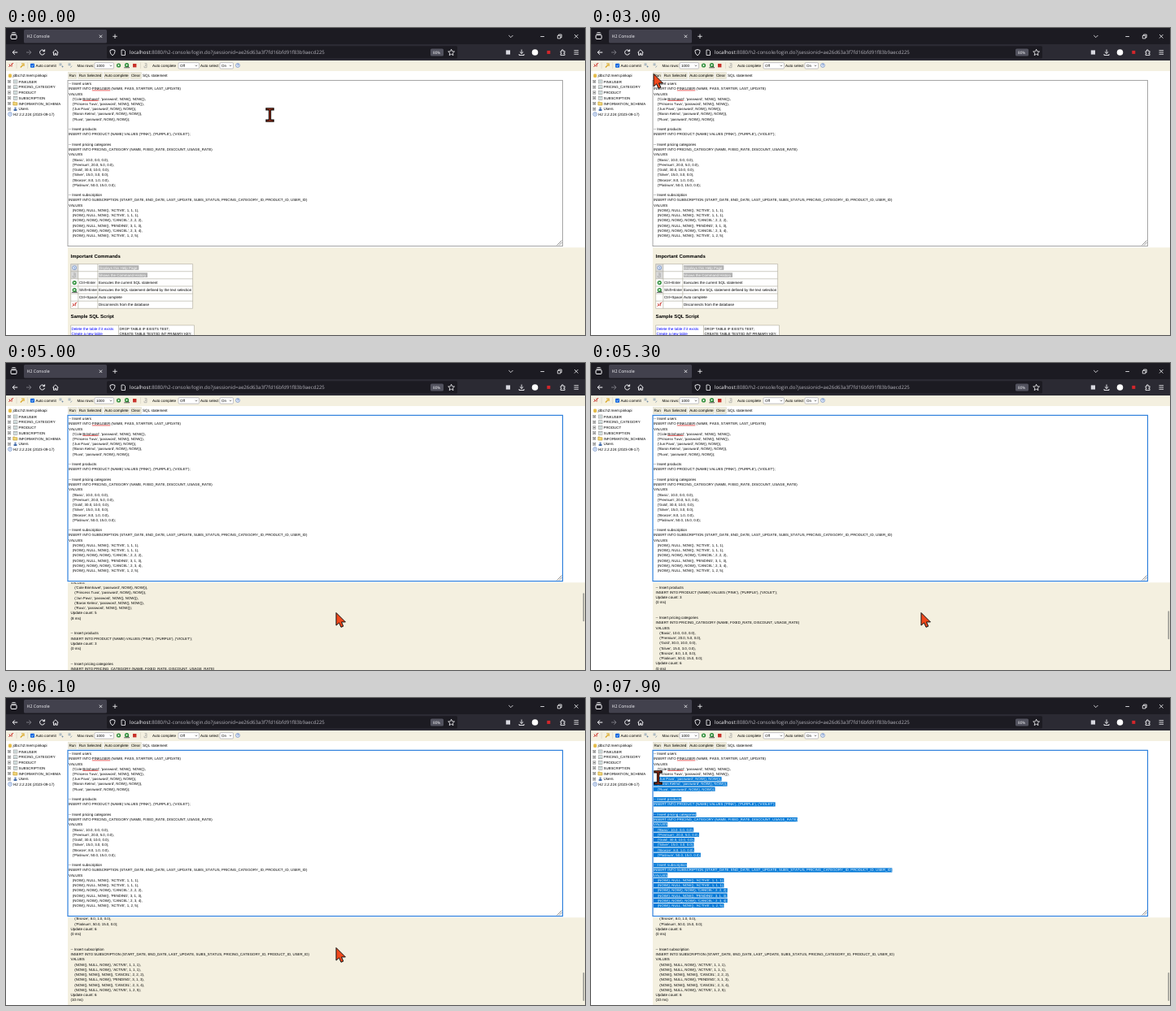
An HTML page for the animation above (8 s loop, 712 px wide and 378 px high).

```html
<!DOCTYPE html>
<html lang="en">
<head>
<meta charset="utf-8">
<title>H2 Console</title>
<style>
html, body { margin: 0; height: 100%; overflow: hidden; background: #fff; }
svg { display: block; width: 712px; height: 378px; }
text { font-family: "Liberation Sans", Arial, sans-serif; font-kerning: none; text-rendering: geometricPrecision; }
.ui { font-family: "Open Sans", "Noto Sans", sans-serif; }
.bold { font-weight: bold; }
</style>
</head>
<body>
<svg id="stage" viewBox="0 0 712 378"></svg>
<script>
const stage = document.getElementById('stage');
const CREAM = '#f4f0e0', LIGHT = '#fbfbfe', BLUE = '#0078d7', GREEN = '#2f8f3a', RED = '#c8322b';

function add(parent, tag, attrs = {}, text) {
  const el = document.createElementNS('http://www.w3.org/2000/svg', tag);
  for (const k in attrs) el.setAttribute(k, attrs[k]);
  if (text !== undefined) el.textContent = text;
  return parent.appendChild(el);
}
const group = (parent, attrs) => add(parent, 'g', attrs);
const rect = (p, x, y, width, height, fill, more) => add(p, 'rect', { x, y, width, height, fill, ...more });
const dot = (p, cx, cy, r, fill, more) => add(p, 'circle', { cx, cy, r, fill, ...more });
const line = (p, d, stroke, w = 1, more) =>
  add(p, 'path', { d, stroke, 'stroke-width': w, fill: 'none', ...more });
// cy is the middle of the capitals
const label = (p, x, cy, str, size = 4.55, fill = '#000', cls = '') =>
  add(p, 'text', { x, y: cy + size * 0.36, 'font-size': size, fill, class: cls }, str);

// ---- Browser frame ----
function browser() {
  const g = group(stage);
  rect(g, 0, 0, 712, 20, '#1c1b22');
  rect(g, 22, 2, 102, 16.5, '#42414d', { rx: 1.5 });
  rect(g, 0, 20, 712, 20, '#2b2a33');
  rect(g, 124, 22.3, 431, 15.2, '#1c1b22', { rx: 1.5 });
  line(g, 'M6.5 7H12.5M7.5 5.5H11.5', LIGHT, .7);
  rect(g, 6, 8.5, 7, 5, 'none', { stroke: LIGHT, rx: 1 });
  label(g, 25.5, 10.3, 'H2 Console', 5.3, LIGHT, 'ui');
  line(g, `M114.8 8.6l3.4 3.4m0-3.4l-3.4 3.4M131.3 10.3h5.4m-2.7-2.7v5.4
    M618.2 9l2.6 2.6 2.6-2.6M657.3 10.5h4.6M678.3 9.3h3.6v3.6h-3.6zM679.6 9.3v-1.3h3.6v3.6h-1.3
    M699 8l4.5 4.5m0-4.5l-4.5 4.5`, LIGHT, .8);
  line(g, 'M14.2 30H8.2m2.7-2.7L8.2 30l2.7 2.7', LIGHT);
  line(g, 'M25 30h6m-2.7-2.7L31 30l-2.7 2.7', '#77767f');
  line(g, 'M47 28.2a3 3 0 1 0 .5 2.6M47.6 26.4v2.3h-2.4', LIGHT);
  line(g, 'M57.4 30.2l3.5-3.4 3.5 3.4M58.5 29.5v3.8h1.7v-2h1.4v2h1.7v-3.8', LIGHT, .9);
  line(g, 'M131 26.5l3 1c0 3-.8 5-3 6.2c-2.2-1.2-3-3.2-3-6.2z', LIGHT, .9);
  line(g, 'M142 27h3l1.5 1.5v5h-4.5z', LIGHT, .8);
  const url = label(g, 152, 30, '', 6.1, '#b4b3bb', 'ui');
  add(url, 'tspan', { fill: LIGHT }, 'localhost');
  add(url, 'tspan', {}, ':8080/h2-console/login.do?jsessionid=ae26d63a3f7fd16bfd91f83b9aecd225');
  rect(g, 522, 25.5, 16, 9, '#52525e', { rx: 1.5 });
  label(g, 525, 30, '80%', 4.7, LIGHT, 'ui');
  line(g, 'M547.6 26.2l1.1 2.6 2.8.2-2.1 1.9.6 2.7-2.4-1.4-2.4 1.4.6-2.7-2.1-1.9 2.8-.2z', LIGHT, .8);
  rect(g, 614.8, 27.4, 5.2, 5.2, '#d8d8df');
  line(g, 'M634 26.5v5m-2.2-2.1l2.2 2.1 2.2-2.1M631 32v1.5h6V32', LIGHT, .9);
  dot(g, 650.5, 30, 3.8, '#fff');
  rect(g, 665.3, 27.9, 4, 4, '#d4262b');
  line(g, 'M682 28.5h1.5v-1.6h1.6v1.6h2v2h-1.2v1.2h1.2v1.8h-5.1v-1.6h1v-1.4h-1z', LIGHT, .8);
  line(g, 'M698.5 27.7h5.6m-5.6 2.3h5.6m-5.6 2.3h5.6', LIGHT, .8);
}

// ---- Console toolbar and tree ----
const play = (g, x, y, r = 2.6) => {
  dot(g, x, y, r, GREEN);
  add(g, 'path', { d: `M${x - .9} ${y - 1.4}l2.4 1.4l-2.4 1.4z`, fill: '#fff' });
};
const playSelected = (g, x, y) => {
  play(g, x, y - .3);
  line(g, `M${x - 3.3} ${y + 2.8}h6.6M${x + 1.5} ${y + 1}l1.6 1.6`, '#333', .8);
};
const info = (g, x, y, mark = '?') => {
  dot(g, x, y, 2.4, '#eef4ff', { stroke: '#4770b5', 'stroke-width': .6 });
  label(g, x - (mark === '?' ? 1 : .5), y, mark, 3.7, '#2857a8', 'bold');
};
const unplug = (g, x, y) =>
  line(g, `M${x - 2.6} ${y + 2}l2-2m1.6-1l2-2M${x - 2} ${y - 1.5}l1.6 2.6M${x + 1} ${y + 1.6}v-4`, RED);
const scroll = (g, x, y) =>
  line(g, `M${x - 1.5} ${y - 2.5}h2.5v5h-3v-2M${x - 1} ${y - 1}h1.4m-1.4 1.3h1.4`, '#999', .6);

function select(g, x, w, str) {
  rect(g, x, 42.7, w, 7.4, '#fff', { rx: 1.2, stroke: '#8f8f9d', 'stroke-width': .5 });
  label(g, x + 2, 46.5, str, 4.5);
  line(g, `M${x + w - 4.8} 45.8l1.3 1.3l1.3-1.3`, '#333', .6);
}

function toolbar() {
  const g = group(stage);
  rect(g, 0, 40, 712, 13, CREAM);
  line(g, 'M13 42.5v7.5M26.5 42.5v7.5M165.5 42.5v7.5', '#cfcbbb', .5);
  unplug(g, 6, 46);
  line(g, 'M17.8 48.5l3-3m-1.8-1.5h3v3', '#d9a520', 1.2);
  rect(g, 30, 43.8, 5, 5, '#0060df', { rx: .8 });
  line(g, 'M31.2 46.3l1 1.1 1.7-2.2', '#fff', .7);
  label(g, 36.5, 46.3, 'Auto commit');
  line(g, 'M65.5 44h3m-3 1.7h3M68.5 47.5h2m-1-1v2M76.5 44h3m-3 1.7h3M79.5 48.5l1.5-1.8', '#5f7f9f', .7);
  label(g, 87.5, 46.3, 'Max rows:');
  select(g, 109, 23.5, '1000');
  play(g, 138.5, 46);
  playSelected(g, 148.5, 46);
  rect(g, 156, 44, 4.4, 4.4, RED);
  scroll(g, 172, 46.2);
  label(g, 180, 46.3, 'Auto complete');
  select(g, 212, 25.5, 'Off');
  label(g, 239, 46.3, 'Auto select');
  select(g, 263, 16.5, 'On');
  info(g, 285, 46);
}

function tree() {
  const g = group(stage);
  rect(g, 3, 56.5, 4, 4.6, '#e5bd4c', { rx: 1.3 });
  label(g, 8.5, 58.8, 'jdbc:h2:mem:pinkapi', 4.6);
  ['PINKUSER', 'PRICING_CATEGORY', 'PRODUCT', 'SUBSCRIPTION', 'INFORMATION_SCHEMA', 'Users'].forEach((name, i) => {
    const y = 66 + 6.75 * i;
    rect(g, 2.4, y - 1.7, 3.4, 3.4, '#fff', { stroke: '#777', 'stroke-width': .5 });
    line(g, `M3 ${y}h2.2m-1.1-1.1v2.2`, '#222', .5);
    if (i < 4) {
      rect(g, 9.3, y - 2, 4.6, 4, '#fff', { stroke: '#777', 'stroke-width': .5 });
      line(g, `M9.3 ${y - .7}h4.6M9.3 ${y + .7}h4.6M11.5 ${y - 2}v4`, '#8aa', .4);
    } else if (i === 4) {
      line(g, `M8.8 ${y + 2}v-4h2l.6.8h2.4v3.2z`, '#b58d20', .6, { fill: '#f3d779' });
    } else {
      dot(g, 11.5, y - 1, 1.2, '#6a88b8');
      rect(g, 9.4, y + .2, 4.2, 2, '#3f68a8', { rx: 1 });
    }
    label(g, 15.5, y, name, name === 'Users' ? 4.6 : 4.36);
  });
  info(g, 5, 106.1, 'i');
  label(g, 9, 106.1, 'H2 2.2.224 (2023-09-17)', 4.61);
}

// ---- Statements ----
const person = name => `    ('${name}', 'password', NOW(), NOW())`;
const price = (name, nums) => `    ('${name}', ${nums})`;
const sub = (end, rest) => `    (NOW(), ${end}, NOW(), ${rest})`;
const rows = list => list.map((s, i) => s + (i < list.length - 1 ? ',' : ';'));

const blocks = [
  { count: 5, ms: 8, sql: ['-- Insert users', 'INSERT INTO PINKUSER (NAME, PASS, STARTER, LAST_UPDATE)', 'VALUES',
    ...rows(['Cole Brimhavel', 'Princess Tuva', 'Jun Pavo', 'Baron Kelmo', 'Ruvo'].map(person))] },
  { count: 3, ms: 0, sql: ['-- Insert products',
    "INSERT INTO PRODUCT (NAME) VALUES ('PINK'), ('PURPLE'), ('VIOLET');"] },
  { count: 6, ms: 0, sql: ['-- Insert pricing categories',
    'INSERT INTO PRICING_CATEGORY (NAME, FIXED_RATE, DISCOUNT, USAGE_RATE)', 'VALUES',
    ...rows([price('Basic', '10.0, 0.0, 0.0'), price('Premium', '20.0, 5.0, 0.0'), price('Gold', '30.0, 10.0, 0.0'),
      price('Silver', '15.0, 3.0, 0.0'), price('Bronze', '8.0, 1.0, 0.0'), price('Platinum', '50.0, 15.0, 0.0')])] },
  { count: 6, ms: 10, sql: ['-- Insert subscription',
    'INSERT INTO SUBSCRIPTION (START_DATE, END_DATE, LAST_UPDATE, SUBS_STATUS, PRICING_CATEGORY_ID, PRODUCT_ID, USER_ID)',
    'VALUES',
    ...rows([sub('NULL', "'ACTIVE', 1, 1, 1"), sub('NULL', "'ACTIVE', 1, 1, 1"), sub('NOW()', "'CANCEL', 2, 2, 2"),
      sub('NULL', "'PENDING', 3, 1, 3"), sub('NOW()', "'CANCEL', 2, 3, 4"), sub('NULL', "'ACTIVE', 1, 2, 5")])] }
];
const script = blocks.flatMap((b, i) => i ? ['', ...b.sql] : b.sql);
const output = blocks.flatMap(b => [...b.sql, `Update count: ${b.count}`, `(${b.ms} ms)`, '', '']);

const PITCH = 6.233, TOP = 65.4;
const sqlLine = (g, x, y, s, fill) => {
  const bare = s.trimStart(), size = /^(--|Up|\(\d+ )/.test(bare) ? 4.54 : 4.36;
  return label(g, x + (s.length - bare.length) * 1.21, y, bare, size, fill);
};

function editor() {
  const g = group(stage);
  [['Run', 76.5, 10.5], ['Run Selected', 88.7, 30], ['Auto complete', 120.3, 31.2], ['Clear', 153, 13.5]].forEach(([s, x, w]) => {
    rect(g, x, 54.6, w, 8, '#ece9d8', { stroke: '#d5d1c0', 'stroke-width': .4 });
    label(g, x + 1, 58.6, s, 4.6);
  });
  label(g, 168, 58.6, 'SQL statement', 4.6);
  const box = rect(g, 76, 64.4, 608.5, 204.2, '#fff');
  line(g, 'M677.5 267.5l6-6M680 267.5l3.5-3.5', '#888', .9);
  script.forEach((s, i) => sqlLine(g, 77, TOP + PITCH * (i + .5), s));
  line(g, 'M105.8 76.9h22.5M94.3 89.4h19.4', '#e02020', .7);
  return box;
}

function selection() {
  const clip = add(add(stage, 'clipPath', { id: 'picked' }), 'path');
  const g = group(stage, { 'clip-path': 'url(#picked)' });
  script.forEach((s, i) => {
    if (!s) return;
    const t = sqlLine(g, 77, TOP + PITCH * (i + .5), s, '#fff');
    const w = +t.getAttribute('x') - 77 + t.getComputedTextLength();
    g.insertBefore(rect(g, 77, TOP + PITCH * i + .6, w, 5.2, BLUE), t);
  });
  const reach = (x, y) => {
    const top = TOP + PITCH * Math.floor((y - TOP) / PITCH);
    clip.setAttribute('d', `M${x} ${top}H700V269H70V${top + PITCH}H${x}z`);
  };
  return { g, reach };
}

// ---- Lower pane ----
function help() {
  const g = group(stage), Y = 290.6, H = 9.12;
  label(g, 79.5, 280.5, 'Important Commands', 5.93, '#000', 'bold');
  rect(g, 79.6, Y, 150, H * 6, '#fff');
  rect(g, 79.6, Y, 9.2, H * 2, '#d9d9d9');
  const grid = [['', 'Displays this Help Page'], ['', 'Shows the Command History'],
    ['Ctrl+Enter', 'Executes the current SQL statement'],
    ['Shift+Enter', 'Executes the SQL statement defined by the text selection'],
    ['Ctrl+Space', 'Auto complete'], ['', 'Disconnects from the database']];
  grid.forEach(([key, text], i) => {
    const y = Y + H * (i + .5);
    if (i < 2) rect(g, 113.8, y - 2.9, i ? 60.2 : 49.5, 5.6, '#b1b1b1');
    label(g, 90, y, key, 4.45);
    label(g, 114, y, text, 4.5, i < 2 ? '#fff' : '#000');
  });
  let d = 'M79.6 290.6v54.7M88.8 290.6v54.7M112.8 290.6v54.7M229.6 290.6v54.7';
  for (let i = 0; i < 7; i++) d += `M79.6 ${Y + H * i}h150`;
  line(g, d + 'M79.6 378v-12H231.5v12M138.5 366v12', '#aca899', .6);
  info(g, 84.2, 295.2);
  scroll(g, 84.2, 304.4);
  play(g, 84.2, 313.6);
  playSelected(g, 84.2, 322.8);
  unplug(g, 84.2, 340.7);
  label(g, 79.5, 355.3, 'Sample SQL Script', 5.93, '#000', 'bold');
  g.insertBefore(rect(g, 79.6, 366, 151.9, 12, '#fff'), g.firstChild);
  [['Delete the table if it exists', 'DROP TABLE IF EXISTS TEST;'],
    ['Create a new table', 'CREATE TABLE TEST(ID INT PRIMARY KEY,']].forEach(([a, b], i) => {
    label(g, 80.5, 370 + 6.3 * i, a, 4.55, '#0000ff');
    label(g, 139.5, 370 + 6.3 * i, b, 4.28);
  });
  return g;
}

function results() {
  rect(add(stage, 'clipPath', { id: 'pane' }), 76, 270.3, 636, 108);
  const g = group(stage, { 'clip-path': 'url(#pane)' }), text = group(g);
  output.forEach((s, i) => sqlLine(text, 79.5, 277 + 6.25 * i, s));
  const thumb = rect(g, 709.5, 276, 1.6, 35, '#989892', { rx: .8 });
  return { g, text, thumb };
}

browser();
toolbar();
tree();
const box = editor(), picked = selection();
rect(stage, 76, 270.3, 636, 108, CREAM);
const helpPane = help(), out = results();

const arrow = add(stage, 'path', {
  d: 'M0 0V15.6L3.6 12.4L6 17.8L8.8 16.6L6.5 11.4H11.4z',
  fill: '#f0491c', stroke: '#111', 'stroke-width': 1, 'stroke-linejoin': 'round'
});
const beam = group(stage);
line(beam, 'M-5.2 -7.2H5.2M-5.2 7.2H5.2M0 -7V7', '#120805', 3.2);
line(beam, 'M-3.8 -7.2H3.8M-3.8 7.2H3.8M0 -7V7', '#a8331c', 1.1);

// ---- Motion: [time, values...] ----
const pointer = [[900, 324.5, 107], [1900, 135.5, 73], [2150, 66, 48], [2400, 77, 56.5], [3700, 77, 56.5],
  [4100, 333.5, 210], [4400, 387, 221], [4600, 387, 221], [4900, 406, 307.5], [6500, 406, 307.5],
  [7300, 134.5, 263], [7400, 134.5, 263], [7900, 82.5, 98]];
const wheel = [[4900, 0], [5300, 76], [5400, 76], [6100, 161.5]];

function at(keys, t) {
  const i = keys.findIndex(k => k[0] > t);
  if (i === 0) return keys[0].slice(1);
  if (i < 0) return keys[keys.length - 1].slice(1);
  const a = keys[i - 1], b = keys[i], f = (t - a[0]) / (b[0] - a[0]);
  return a.slice(1).map((v, n) => v + (b[n + 1] - v) * f);
}
const show = (el, on) => el.setAttribute('visibility', on ? 'visible' : 'hidden');
const move = (el, x, y) => el.setAttribute('transform', `translate(${x} ${y})`);

function draw() {
  const t = performance.now() % 8000;
  const [x, y] = at(pointer, t), [top] = at(wheel, t), ran = t >= 3300;
  const inEditor = x > 76 && x < 684 && y > 64 && y < 269;
  show(helpPane, !ran);
  show(out.g, ran);
  box.setAttribute('stroke', ran ? '#2f80dc' : '#8f8f8f');
  box.setAttribute('stroke-width', ran ? 1.2 : .8);
  move(out.text, 0, -top);
  move(out.thumb, 0, top * .384);
  show(arrow, !inEditor);
  show(beam, inEditor);
  move(arrow, x, y);
  move(beam, x, y);
  show(picked.g, t >= 7400);
  picked.reach(x, y);
  requestAnimationFrame(draw);
}
draw();
</script>
</body>
</html>
```
